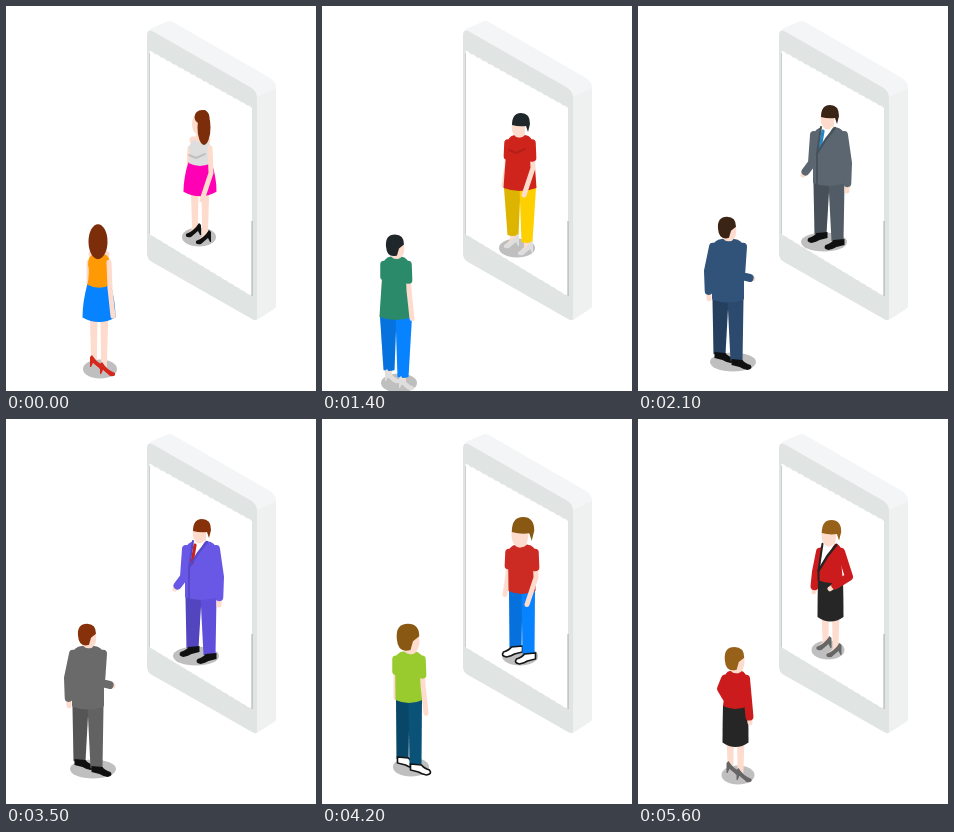
An HTML page for the animation above (6.3 s loop, 310x385 px).

```html
<!DOCTYPE html>
<html lang="en">
<head>
<meta charset="utf-8">
<title>Mirror phone</title>
<style>
  html, body { margin: 0; width: 100%; height: 100%; overflow: hidden; background: #fff; }
  svg { display: block; width: 310px; height: 385px; }
  .limb { fill: none; stroke-linecap: round; stroke-linejoin: round; }
</style>
</head>
<body>
<svg id="stage" viewBox="0 0 310 385">
  <path fill="#eff1f1" d="M150 70 251 90 270 80V300Q270 302 268 303L251 314Q249 315 247 313z"/>
  <path fill="#f4f5f6" d="M141 27Q142 24 146 22L160 16Q163 14 167 16L264 72Q270 76 270 82L251 91 150 50z"/>
  <path fill="#e0e4e3" d="M141 30Q141 22 148 26L244 81Q251 85 251 92V311Q251 316 246 313L146 256Q141 253 141 248z"/>
  <path fill="#fff" d="M143.5 45 246 102V290L143.5 228z"/>
  <path fill="none" stroke="#fff" stroke-dasharray="4 3" d="M144 45 246 102M144 228 246 290"/>
  <path fill="none" stroke="#c3c7c7" stroke-width=".8" d="M143.5 47V228"/>
  <path fill="none" stroke="#a6aaaa" d="M246 215V290"/>
</svg>
<script>
const HOLD = 700;
const SKIN = '#fddbcd';
const stage = document.getElementById('stage');

function add(parent, tag, attrs) {
  const node = document.createElementNS('http://www.w3.org/2000/svg', tag);
  for (const key in attrs) node.setAttribute(key, attrs[key]);
  return parent.appendChild(node);
}
const shape = (parent, fill, d, more) => add(parent, 'path', { d, fill, ...more });
const oval = (parent, fill, cx, cy, rx, ry) => add(parent, 'ellipse', { cx, cy, rx, ry, fill });
const limb = (parent, stroke, width, points) =>
  add(parent, 'path', { class: 'limb', d: 'M' + points.join('L'), stroke, 'stroke-width': width });
const mix = (a, b, f) => a.map((v, i) => v + (b[i] - v) * f);

// Elbow and hand, measured from the shoulder: screen left arm, then right arm.
const gestures = {
  hang: {
    far: [[[-1, 22], [-4, 42]], [[1, 25], [-8, 52]]],
    near: [[[0, 20], [0, 38]], [[1, 26], [4, 54]]]
  },
  business: {
    far: [[[-2, 28], [-11, 40]], [[4, 28], [3, 56]]],
    near: [[[-5, 24], [-4, 52]], [[-2, 29], [10, 32]]]
  },
  akimbo: {
    far: [[[-4, 20], [-6, 40]], [[8, 25], [-11, 37]]],
    near: [[[-4, 10], [3, 22]], [[2, 22], [4, 44]]]
  }
};

// Every path below faces right; the mirrored person is flipped by scale(-1, 1).
const shoes = {
  flat: 'M-7-2 4-1Q6 2 12 4Q15 8 9 9Q4 8 1 6L-7 4z',
  heel: 'M-4-6Q1 2 9 5Q10 9 4 8L-3 2-5 6-6 6-6-4z'
};

const hairstyles = {
  short(head, color, isFar) {
    oval(head, SKIN, 2.5, 14, 6.8, 10.5);
    shape(head, color, isFar
      ? 'M9 12Q9 0 0 0Q-9 0-9 11L-7 19-5 13Q2 14 9 12z'
      : 'M9 10Q9 0 0 0Q-10 0-9 12Q-8 24 2 21L4 14z');
  },
  long(head, color, isFar) {
    if (isFar) oval(head, SKIN, 3.5, 14, 5.5, 10);
    oval(head, color, isFar ? -3 : 0, 17.5, isFar ? 6.5 : 9.5, 17.5);
    if (isFar) oval(head, color, -1, 7, 7.5, 7);
  },
  bald(head, color, isFar) {
    oval(head, color, -1, 10, 8.3, 10);
    if (isFar) oval(head, SKIN, 3, 13, 6.3, 12);
    else {
      oval(head, SKIN, 4, 16, 5, 8);
      oval(head, color, -2, 11, 7, 9);
      oval(head, SKIN, 0, 5, 7.5, 4.5);
    }
  }
};

function drawLegs(body, look, center, hem, turn) {
  const { hip, stance, skirt, bottom, shoe = 'flat', shoeColor, outline } = look;
  [-1, 1].forEach(side => {
    const ankle = [center + side * stance, side < 0 ? -8 : -1];
    const heeled = shoe === 'heel';
    const foot = () => shape(body, shoeColor, shoes[shoe], {
      transform: `translate(${ankle[0] + (turn > 0 ? 2 : 0)} ${ankle[1]}) scale(${turn} 1)`,
      stroke: outline || 'none', 'stroke-width': 1.6
    });
    const taper = (fill, top, middle, half, end) => shape(body, fill,
      `M${center + side * top} ${hem} ${center + middle} ${hem} ${ankle[0] - side * half} ${end}` +
      `Q${ankle[0]} ${end + 2} ${ankle[0] + side * half} ${end}z`);

    if (heeled) taper(SKIN, 10, side, 2.8, ankle[1] + 2);
    if (heeled) limb(body, SKIN, 4, [ankle, [ankle[0] + turn * 5, ankle[1] + 5]]);
    if (!skirt) {
      const end = ankle[1] - (heeled ? 5 : 0);
      taper(bottom, hip - .5, -side * .5, heeled ? 5.5 : 6, end);
      if (side < 0) taper('#0002', hip - .5, -side * .5, heeled ? 5.5 : 6, end);
    }
    foot();
  });
  if (skirt) {
    const half = skirt.half, end = hem * skirt.length;
    shape(body, bottom, `M${center - hip} ${hem - 1}H${center + hip}` +
      `Q${center + half} ${(hem + end) / 2} ${center + half} ${end}` +
      `Q${center} ${end + 9} ${center - half} ${end}Q${center - half} ${(hem + end) / 2} ${center - hip} ${hem - 1}z`);
  }
}

function drawArm(body, look, joint, [elbowBy, handBy], top) {
  const at = by => [joint[0] + by[0], joint[1] + by[1]];
  const elbow = at(elbowBy), hand = at(handBy);
  limb(body, SKIN, 5, [joint, elbow, hand]);
  if (look.sleeve === 'long') limb(body, top, 8, [joint, elbow, mix(elbow, hand, .72)]);
  if (look.sleeve === 'short') limb(body, top, 7.5, [joint, mix(joint, elbow, .6)]);
}

function drawFront(body, look, x, y, hem) {
  if (look.fold) limb(body, '#0002', 2, [[x - 11, y + 15], [x - 4, y + 18], [x + 5, y + 14]]);
  if (!look.lapel) return;
  shape(body, '#fff', `M${x - 8} ${y}H${x + 4}L${x - 11} ${y + 27}z`);
  if (look.tie) limb(body, look.tie, 3.2, [[x - 6, y + 4], [x - 9, y + 22]]);
  limb(body, look.lapel, 2.4, [[x + 6, y + 1], [x - 3, y + 12], [x - 12, y + 27]]);
  limb(body, look.lapel, 2, [[x - 8, y], [x - 12, y + 27], [x - 12, hem]]);
}

// All heights are measured up from the floor shadow, with the body leaning off its centre.
function drawPerson(parent, look, side) {
  const isFar = side === 'far', turn = isFar ? -1 : 1;
  const { ground, top, bottom, shoeColor = look.shoeColor } = look[side];
  const stretch = isFar ? 1 : look.stretch;
  const size = look.headSize || 1;
  const height = look.height * stretch, hem = -look.hem * stretch;
  const center = -turn * look.lean;
  const neck = -height + 22 * size;
  const collar = neck + (look.neckline || 0);
  const body = add(parent, 'g', { transform: `translate(${ground})` });
  const joints = [-1, 1].map(s => [center + s * (look.shoulder - 1), collar + 8]);
  const arms = gestures[look.gesture || 'hang'][side];

  oval(body, '#bfbfbf', 0, 0, look.shadow, 9.5);
  drawArm(body, look, joints[0], arms[0], top);
  drawLegs(body, { ...look, bottom, shoeColor }, center, hem, turn);

  limb(body, SKIN, 8, [[center - turn, neck - 4], [center, neck + 5]]);
  if (look.neckline) limb(body, SKIN, 7, [[center - 7, collar], [center + 7, collar]]);
  const { shoulder, hip, waist = (shoulder + hip) / 2 } = look;
  const middle = (collar + hem) / 2;
  shape(body, top, `M${center - 5} ${collar}Q${center - shoulder} ${collar + 1} ${center - shoulder} ${collar + 11}` +
    `Q${center - waist} ${middle} ${center - hip} ${hem}Q${center} ${hem + 6} ${center + hip} ${hem}` +
    `Q${center + waist} ${middle} ${center + shoulder} ${collar + 11}` +
    `Q${center + shoulder} ${collar + 1} ${center + 5} ${collar}Q${center} ${collar + 5} ${center - 5} ${collar}z`);
  if (isFar) drawFront(body, look, center, collar, hem);

  const head = add(body, 'g', {
    transform: `translate(${-turn * (look.lean + 1)} ${-height}) scale(${turn * size} ${size})`
  });
  hairstyles[look.hairstyle || 'short'](head, look.hair, isFar);
  drawArm(body, look, joints[1], arms[1], top);
}

const girl = {
  height: 127, stretch: 1.14, hem: 74, lean: 1, shoulder: 11, hip: 11.5, waist: 9, stance: 5, shadow: 17,
  neckline: 8, hairstyle: 'long', hair: '#7c2e0b', shoe: 'heel', skirt: { half: 16.5, length: .61 }, fold: true,
  far: { ground: [193, 231], top: '#dedede', bottom: '#ff00b4', shoeColor: '#101010' },
  near: { ground: [94, 363], top: '#ff9a05', bottom: '#0783ff', shoeColor: '#d2281e' }
};
const mother = {
  height: 135, stretch: 1.1, hem: 60, lean: 3, shoulder: 13, hip: 16.5, stance: 7, shadow: 18,
  hair: '#20272a', shoe: 'heel', shoeColor: '#dedede', sleeve: 'short', fold: true,
  far: { ground: [195, 242], top: '#cf241c', bottom: '#ffd000' },
  near: { ground: [77, 377], top: '#2b8a69', bottom: '#0783ff' }
};
const elder = {
  height: 134, stretch: 1.07, hem: 69, lean: 4, shoulder: 16, hip: 16.5, stance: 7.5, shadow: 23,
  hairstyle: 'bald', hair: '#999', shoeColor: '#885012', sleeve: 'long',
  far: { ground: [192, 239], top: '#cf241c', bottom: '#1f2d10' },
  near: { ground: [95, 353], top: '#3398cc', bottom: '#6b6b6b' }
};
const manager = {
  height: 137, stretch: 1.06, hem: 59, lean: 5, shoulder: 16, hip: 16, stance: 8.5, shadow: 23,
  hair: '#86310a', shoeColor: '#101010', sleeve: 'long', gesture: 'business', lapel: '#5648c8', tie: '#cc2018',
  far: { ground: [190, 237], top: '#6958e6', bottom: '#604fdb' },
  near: { ground: [87, 350], top: '#6a6a6a', bottom: '#626262' }
};
const boy = {
  height: 139, stretch: 1.03, hem: 65, lean: 2, shoulder: 14, hip: 13.5, stance: 6.5, shadow: 18,
  headSize: 1.25, hair: '#895913', shoeColor: '#fff', outline: '#151515', sleeve: 'short',
  far: { ground: [198, 237], top: '#cb2b22', bottom: '#0783ff' },
  near: { ground: [89, 348], top: '#99cb2f', bottom: '#0b5279' }
};
const clerk = {
  height: 130, stretch: .985, hem: 70, lean: 2.5, shoulder: 11.5, hip: 12.5, waist: 10, stance: 5, shadow: 16.5,
  headSize: 1.08, hair: '#98611a', shoe: 'heel', shoeColor: '#666', sleeve: 'long', gesture: 'akimbo',
  lapel: '#242424', skirt: { half: 13, length: .47 },
  far: { ground: [190, 231], top: '#cc1b1c', bottom: '#262626' },
  near: { ground: [100, 356], top: '#cc1b1c', bottom: '#262626' }
};

const cast = [
  girl,
  { ...clerk, hair: '#7c2e0b', lapel: '#1d6797',
    far: { ground: [191, 237], top: '#2586c4', bottom: '#444' },
    near: { ground: [96, 363], top: '#8a4fb0', bottom: '#333' } },
  mother,
  { ...manager, hair: '#3a2416', lapel: '#48525b', tie: '#2586c4',
    far: { ground: [186, 236], top: '#5b6670', bottom: '#525c66' },
    near: { ground: [95, 356], top: '#31537a', bottom: '#2b4a6e' } },
  elder,
  manager,
  boy,
  { ...boy, hair: '#33241b',
    far: { ground: [197, 237], top: '#2b8a69', bottom: '#5b5b5b' },
    near: { ground: [93, 358], top: '#ff9a05', bottom: '#31537a' } },
  clerk
];

const scenes = cast.map(look => {
  const scene = add(stage, 'g', { visibility: 'hidden' });
  drawPerson(scene, look, 'far');
  drawPerson(scene, look, 'near');
  return scene;
});

const start = performance.now();
function render() {
  const step = Math.floor((performance.now() - start) / HOLD) % scenes.length;
  scenes.forEach((scene, i) => scene.setAttribute('visibility', i === step ? 'visible' : 'hidden'));
  requestAnimationFrame(render);
}
render();
</script>
</body>
</html>
```
